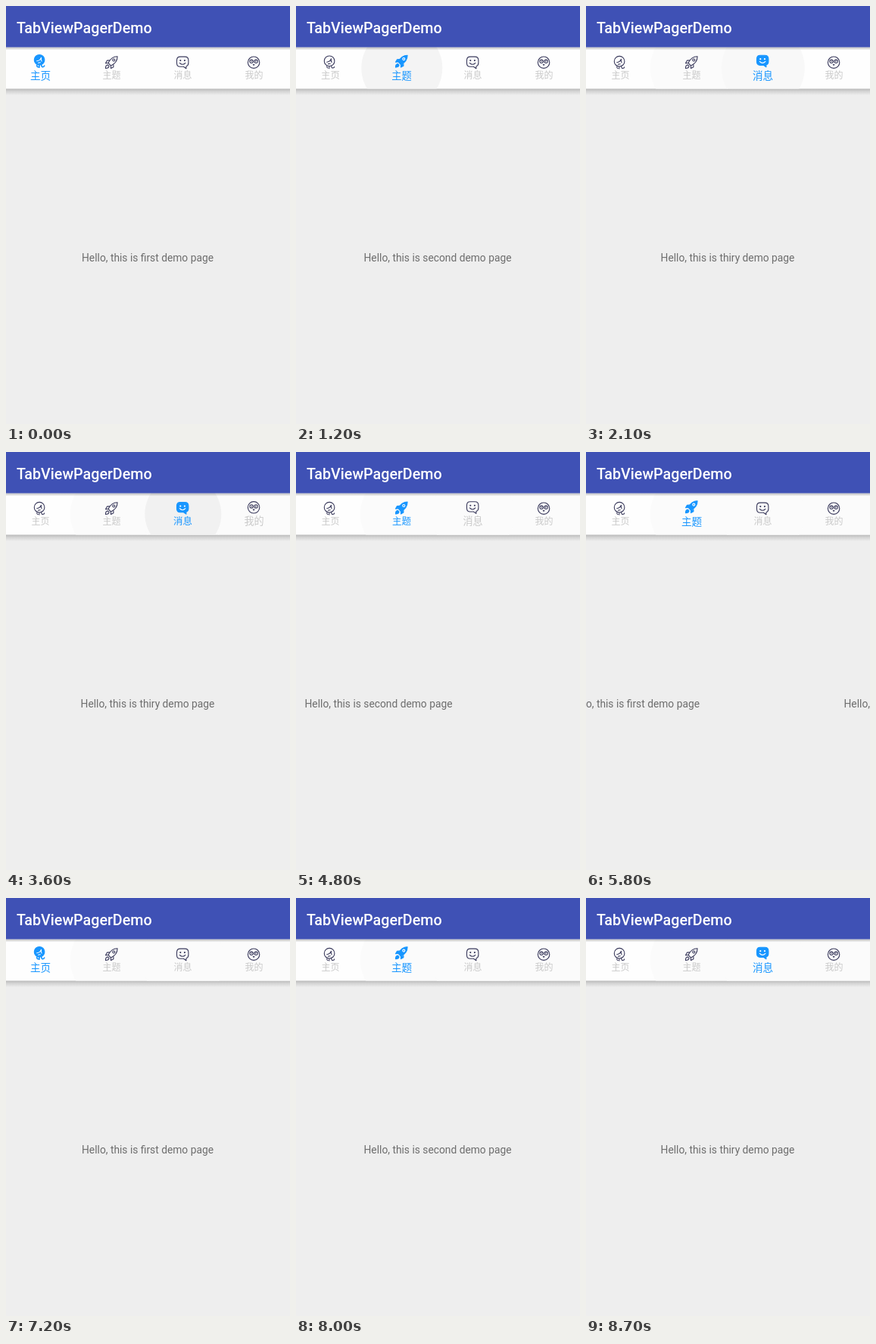
An HTML page for the animation above (9600 ms loop, 375x553 px).

```html
<!DOCTYPE html>
<html lang="zh">
<head>
<meta charset="utf-8">
<title>TabViewPagerDemo</title>
<style>
  html, body { margin: 0; width: 100%; height: 100%; overflow: hidden; background: #eee; }
  svg { display: block; width: 375px; height: 553px; }
  .title { font: 500 19.7px Roboto, sans-serif; fill: #fff; }
  .page { font: 400 13.8px Roboto, sans-serif; fill: #6d6d6d; text-anchor: middle; }
  .label { font-family: "Noto Sans CJK SC", "Noto Sans CJK", sans-serif; fill: #c9c9c9; text-anchor: middle; }
  .shape, .detail { fill: none; stroke: #3a3a5c; stroke-width: 1.1; stroke-linecap: round; stroke-linejoin: round; }
  .dot { fill: #3a3a5c; }
  .on .label { fill: #1896ff; }
  .on .shape { fill: #1896ff; stroke: #1896ff; }
  .on .legs { fill: none; stroke-width: 1.7; }
  .on .detail { stroke: #fff; }
  .on .dot { fill: #fff; }
</style>
</head>
<body>
<svg viewBox="0 0 375 553">
  <defs>
    <linearGradient id="barShade" x2="0" y2="1">
      <stop offset="0" stop-color="#b4b4b4"/>
      <stop offset=".4" stop-color="#d2d2d2"/>
      <stop offset="1" stop-color="#eee"/>
    </linearGradient>
    <linearGradient id="topShade" x2="0" y2="1">
      <stop offset="0" stop-opacity=".25"/>
      <stop offset="1" stop-opacity="0"/>
    </linearGradient>
    <clipPath id="bar"><rect y="54" width="375" height="55.5"/></clipPath>
  </defs>
  <rect width="375" height="553" fill="#eee"/>
  <g id="pages"></g>
  <rect y="109" width="375" height="9" fill="url(#barShade)"/>
  <rect y="54" width="375" height="55.5" fill="#fefefe"/>
  <g id="ripples" clip-path="url(#bar)"></g>
  <rect y="54.5" width="375" height="4" fill="url(#topShade)"/>
  <rect width="375" height="54.5" fill="#3f51b5"/>
  <text class="title" x="14" y="35.6">TabViewPagerDemo</text>
  <g id="tabs"></g>
</svg>
<script>
const LOOP = 9600, STEP = 100, WIDTH = 375;
const BLEND = [0.3, 0.75, 1];

const labels = ['主页', '主题', '消息', '我的'];
const ordinals = ['first', 'second', 'thiry', 'fourth'];
const tabX = i => 45.5 + 94 * i;

const icons = [
  `<circle class="shape" cy="-1.5" r="6.8"/>
   <path class="shape legs" d="M-3.3 5.3q0 2.7 1.6 2.5M-.2 5.8v2.6M2.6 5q.2 3 2 2.8 1.8-.2 2-1.6"/>
   <path class="detail" d="M-3.4 0Q.6-.2 2.4-4.4M2.4-4.4Q1.8-1.6 3 .2M-1.6 2.4L1.2 2"/>`,
  `<path class="shape" d="M-2.4-2.8L-5.6-2.6-7.6 1-4 .6M2.8 3.2L2.8 6-.6 7.8-.6 4.4"/>
   <path class="shape" d="M8-8C3-8-1.2-5.4-4 .6L-.6 4.4C5.4 1.4 8-3 8-8Z"/>
   <path class="shape" d="M-4.6 3.2Q-7.8 3.4-7.6 7.8-3.4 7.8-3 5Z"/>
   <circle class="detail" cx="3.2" cy="-3.2" r="1.5"/>`,
  `<path class="shape" d="M-3-7.6H3Q7.8-7.6 7.8-2.8V.6Q7.8 4 4.8 5.2L4.8 8 1.4 5.6H-3Q-7.6 5.6-7.6.8V-2.8Q-7.6-7.6-3-7.6Z"/>
   <path class="detail" d="M-3.8.6Q0 4.6 3.8.6"/>
   <circle class="dot" cx="-2.8" cy="-2.6" r="1.1"/><circle class="dot" cx="2.8" cy="-2.6" r="1.1"/>`,
  `<circle class="shape" r="7.7"/>
   <circle class="detail" cx="-3" cy="-1.4" r="2.2"/><circle class="detail" cx="3" cy="-1.4" r="2.2"/>
   <circle class="dot" cx="-2.8" cy="-1.4" r=".7"/><circle class="dot" cx="2.8" cy="-1.4" r=".7"/>
   <path class="dot" d="M-1.6 2.2H1.6L0 4.6Z"/>`
];

// [time, tab]
const taps = [[1100, 1], [1900, 2], [2700, 3], [3600, 2]];
const selections = [[0, 0], ...taps, [4800, 1], [5900, 0], [7800, 1], [8500, 2]];

// Swipes: [start, scroll offset at each step]
const swipes = [
  [4500, [735, 665, 560, 453, 408, 386, 377, 375]],
  [5500, [355, 285, 200, 124, 45, 8, 0]],
  [7700, [60, 290, 355, 375]],
  [8400, [425, 590, 725, 750]]
];
const scrollSteps = [
  [0, 0],
  ...taps.map(([at, tab]) => [at, tab * WIDTH]),
  ...swipes.flatMap(([start, xs]) => xs.map((x, k) => [start + k * STEP, x]))
];

const fill = (id, html) => {
  const group = document.getElementById(id);
  group.innerHTML = html;
  return [...group.children];
};

const pages = fill('pages', ordinals.map(word =>
  `<text class="page" y="338">Hello, this is ${word} demo page</text>`).join(''));
const ripples = fill('ripples', taps.map(([, tab]) =>
  `<circle cx="${tabX(tab) + 0.3}" cy="82"/>`).join(''));
const tabs = fill('tabs', labels.map((label, i) =>
  `<g><g class="icon">${icons[i]}</g><text class="label" x="${tabX(i)}">${label}</text></g>`).join(''));
const iconNodes = tabs.map(tab => tab.querySelector('.icon'));
const labelNodes = tabs.map(tab => tab.querySelector('.label'));

const lastIndex = (steps, t) => steps.findLastIndex(([at]) => at <= t);

function drawTabs(t) {
  const n = lastIndex(selections, t);
  const [since, current] = selections[n];
  const previous = n ? selections[n - 1][1] : -1;
  const blend = n ? BLEND[Math.min((t - since) / STEP, 2)] : 1;
  tabs.forEach((tab, i) => {
    const grow = i === current ? blend : i === previous ? 1 - blend : 0;
    const size = 12 + 1.6 * grow;
    tab.setAttribute('class', i === current ? 'on' : '');
    iconNodes[i].setAttribute('transform', `translate(${tabX(i) - (i ? 0.4 : 1.4)} ${74.7 - 1.9 * grow})`);
    labelNodes[i].setAttribute('font-size', size);
    labelNodes[i].setAttribute('y', 91.5 + 0.38 * size);
  });
}

function drawRipples(t) {
  taps.forEach(([at], i) => {
    const age = Math.min((t - at) / STEP, 2);
    const settled = t >= (i + 1 < taps.length ? taps[i + 1][0] : 4500);
    ripples[i].setAttribute('r', age < 0 ? 0 : [50.5, 53.5, 55][age]);
    ripples[i].setAttribute('fill', settled ? '#fbfbfb' : ['#f1f1f1', '#f4f4f4', '#f8f8f8'][Math.max(age, 0)]);
  });
}

function draw(now) {
  // The picture advances in whole steps.
  const t = Math.floor((now % LOOP) / STEP) * STEP;
  const scroll = scrollSteps[lastIndex(scrollSteps, t)][1];
  pages.forEach((page, i) => page.setAttribute('x', 187 + i * WIDTH - scroll));
  drawTabs(t);
  drawRipples(t);
}

const start = performance.now();
function tick() {
  draw(performance.now() - start);
  requestAnimationFrame(tick);
}
tick();
</script>
</body>
</html>
```
